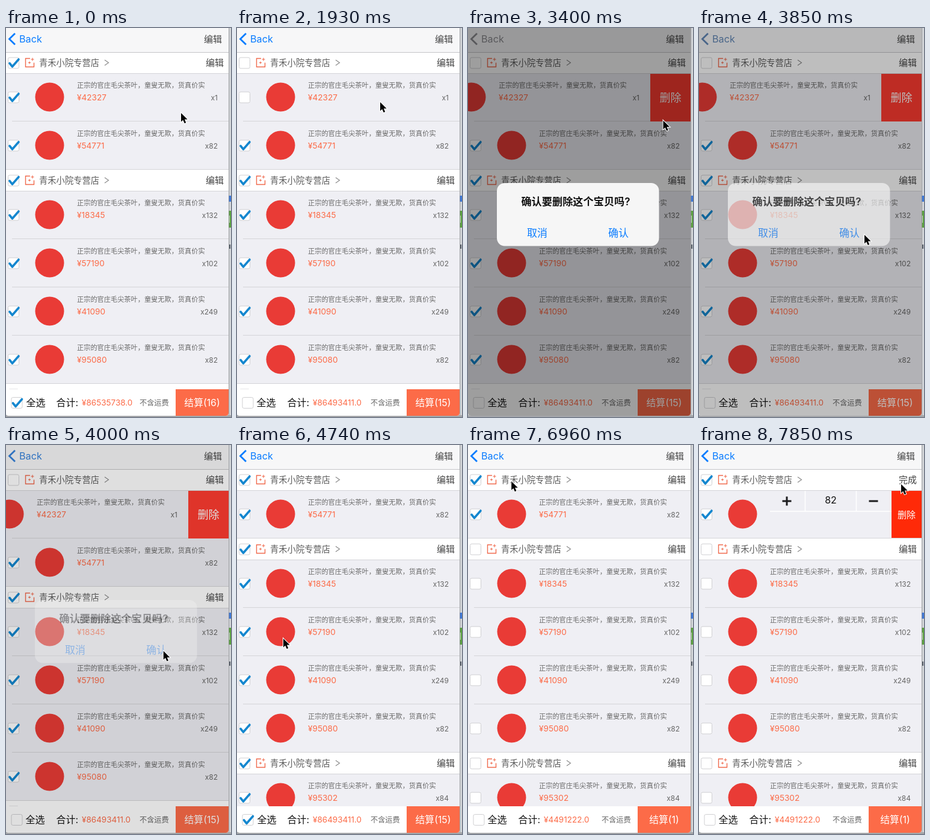
An HTML page for the animation above (8 s loop, 374 by 645 pixels).

```html
<!DOCTYPE html>
<html lang="zh-CN">
<head>
<meta charset="utf-8">
<style>
html, body { margin: 0; width: 100%; height: 100%; overflow: hidden; background: #d3d6d9; }
svg { display: block; width: 374px; height: 645px; }
text { font-family: Inter, "Noto Sans CJK SC", "Noto Sans CJK", sans-serif; white-space: pre; }
</style>
</head>
<body>
<svg id="stage" viewBox="0 0 374 645"></svg>
<script>
const LOOP = 8000, STEPS = 54;
const SHOP = '青禾小院专营店';
const ITEM = '正宗的官庄毛尖茶叶，童叟无欺，货真价实';
const ORANGE = '#fc6b48', BLUE = '#0a7cff';

// Steps at which the user's actions take effect
const UNCHECK = 7, SWIPE = 13, ALERT = 21, DELETED = 28, CLEAR = 37, PICK = 46, EDIT = 52;

// Pointer stops: step, x, y
const stops = [
  [0, 290, 140], [1, 308, 114], [4, 5, 121], [UNCHECK, 10, 122],
  [SWIPE, 237, 122], [16, 160, 124], [20, 322, 184], [22, 332, 120],
  [26, 274, 342], [32, 76, 320], [36, 17, 620], [40, 40, 98],
  [45, 10, 58], [EDIT, 335, 64]
];

const clamp = v => Math.max(0, Math.min(1, v));
const ease = p => (1 - Math.cos(Math.PI * clamp(p))) / 2;

function pointerAt(n) {
  const i = stops.findIndex(s => s[0] > n);
  if (i < 0) return stops[stops.length - 1].slice(1);
  const [n0, x0, y0] = stops[i - 1], [n1, x1, y1] = stops[i];
  const p = ease((n - n0) / (n1 - n0));
  return [x0 + (x1 - x0) * p, y0 + (y1 - y0) * p];
}

const swipeAt = n => 67 * ease((n - SWIPE) / 3);
const alertAt = n => clamp(Math.min((n - ALERT) / 2, (DELETED - n) / 3));

const rect = (x, y, w, h, fill, more = '') =>
  `<rect x="${x}" y="${y}" width="${w}" height="${h}" fill="${fill}" ${more}/>`;
const line = (d, color, width, more = '') =>
  `<path d="${d}" fill="none" style="stroke:${color}" stroke-width="${width}" ${more}/>`;
const text = (s, x, y, size, fill, more = '') =>
  `<text x="${x}" y="${y}" font-size="${size}" style="fill:${fill}" ${more}>${s}</text>`;
const middle = 'text-anchor="middle"', end = 'text-anchor="end"';

function checkbox(x, y, on) {
  return rect(x - 8.5, y - 9, 18, 18, '#fff', 'rx="2.5" stroke="#cfcfd2"') +
    (on ? line(`M${x - 6} ${y + .5}L${x - 1.5} ${y + 6}L${x + 9} ${y - 6}`, '#1587cf', 3.6,
      'stroke-linecap="round" stroke-linejoin="round"') : '');
}

function header(y, on, editing) {
  return rect(0, y, 370, 35, '#fff') +
    line(`M0 ${y - .5}H370M0 ${y + 35.5}H370`, '#d4d4d8', 1) +
    checkbox(12, y + 18, on) +
    line(`M40 ${y + 10.5}H32.5V${y + 24.5}H46.5V${y + 17.5}`, '#f0694c', 1.4) +
    line(`M44 ${y + 9.5}v5M41.5 ${y + 12}h5M39 ${y + 15.5}v4M37 ${y + 17.5}h4`, '#f0694c', 1.1) +
    text(SHOP, 55, y + 23, 14.3, '#5c5c5c') +
    line(`M164 ${y + 13}L170.5 ${y + 17.5}L164 ${y + 22}`, '#888', 1.1) +
    text(editing ? '完成' : '编辑', 332, y + 23, 15, '#444');
}

function editor(y) {
  return line(`M118 ${y + 35}H320M176.5 ${y}V${y + 35}M261.5 ${y}V${y + 35}`, '#fff', 1.5) +
    line(`M138.5 ${y + 18}H153.5M146 ${y + 10.5}V${y + 25.5}M282.5 ${y + 18}H297.5`, '#1c1c1e', 3) +
    text('82', 219, y + 22, 16, '#111', middle) +
    rect(320, y, 50, 80, '#ff2a08') +
    text('删除', 345, y + 45.5, 15, '#fff', middle);
}

function row(y, [price, qty], on, shift, editing) {
  const info = editing ? editor(y) :
    text(ITEM, 118, y + 23.5, 11.2, '#6a6a6a') +
    text('¥' + price, 118, y + 45, 13.6, ORANGE) +
    text('x' + qty, 352, y + 44.5, 12, '#666', end);
  return rect(0, y, 370, 80, '#efeff4') +
    line(`M10 ${y + 79.5}H370`, '#d4d4d8', 1) +
    `<g transform="translate(${-shift} 0)">` + checkbox(12, y + 40, on) +
    `<circle cx="72.5" cy="${y + 39.5}" r="24" fill="#e93b36"/>${info}</g>` +
    rect(370 - shift, y, shift, 80, '#ff3b30') +
    (shift > 40 ? text('删除', 370 - shift / 2, y + 46.5, 18, '#fff', middle) : '');
}

function list(n) {
  const deleted = n >= DELETED, cleared = n >= CLEAR, picked = n >= PICK;
  const groups = [
    [[42327, 1], [54771, 82]].slice(deleted ? 1 : 0),
    [[18345, 132], [57190, 102], [41090, 249], [95080, 82]],
    [[95302, 84]]
  ];
  const unticked = n >= UNCHECK && !deleted;
  let y = 40, out = '';
  groups.forEach((items, g) => {
    const on = !cleared || (g === 0 && picked), editing = g === 0 && n >= EDIT;
    const top = y;
    y += 35;
    items.forEach((item, i) => {
      const first = g === 0 && i === 0 && !deleted;
      out += row(y, item, on && !(first && unticked), first ? swipeAt(n) : 0, editing);
      y += 80;
    });
    out += header(top, on && !(g === 0 && unticked), editing);
  });
  return out;
}

function footer(n) {
  const [sum, count] = n >= PICK ? ['4491222.0', 1] : n >= CLEAR ? ['0.0', 0] :
    n >= UNCHECK ? ['86493411.0', 15] : ['86535738.0', 16];
  const all = n < UNCHECK || (n >= DELETED && n < CLEAR);
  return rect(0, 599, 370, 44, '#fff') + checkbox(17.5, 621.5, all) +
    text('全选', all ? 33.5 : 32.5, 627, 16, '#111') +
    text('合计:', 83.5, 627, 16, '#111') +
    text('¥' + sum, 126, 626, 13.5, ORANGE) +
    text('不含运费', 222, 625.5, 12.2, '#666') +
    rect(282, 599, 88, 44, ORANGE) +
    text(`结算(${count})`, 326, 626.5, 15.8, '#fff', middle);
}

function nav(dim) {
  const tint = `color-mix(in srgb, ${BLUE}, #8e8e93 ${dim * 100}%)`;
  return rect(0, 0, 370, 40, '#f7f7f8') + line('M0 40.5H370', '#c4c4c8', 1) +
    line('M15 9L5.5 18.3L15 27.6', tint, 2.8) +
    text('Back', 22, 24, 16.2, tint) +
    text('编辑', 329, 23.5, 15, '#444');
}

function alertBox(a) {
  if (!a) return '';
  return rect(0, 0, 370, 643, '#000', `opacity="${a * .38}"`) + `<g opacity="${a}">` +
    rect(48, 257, 269.5, 104.5, '#f6f6f6', 'rx="13"') +
    text('确认要删除这个宝贝吗?', 179, 294, 17.2, '#111', middle + ' font-weight="600"') +
    text('取消', 115, 346, 17, BLUE, middle) +
    text('确认', 250, 346, 17, BLUE, middle) + '</g>';
}

function pointer(n) {
  if (n > 1 && n < 4) return '';
  const [x, y] = pointerAt(n);
  return `<path transform="translate(${x} ${y})" d="M1 1V15.5L4.2 12.5L6.7 18L9.2 16.9L6.9 11.6H11.6Z" stroke="#fff" stroke-width="2" paint-order="stroke"/>`;
}

// Sliver of the desktop behind the phone window
const backdrop = rect(0, 0, 374, 645, '#d3d6d9') +
  rect(370, 278, 4, 10, '#3d78d8') + rect(370, 303, 4, 28, '#5aa13f') +
  rect(371, 311, 1, 12, '#d9ead3') + rect(371, 359, 2, 7, '#4d5560') +
  rect(370, 0, 1.2, 645, '#8f9194', 'opacity=".7"') +
  rect(0, 642, 374, 3, '#a5a7aa');

const clip = '<clipPath id="win"><path d="M0 0H370V638Q370 643 365 643H5Q0 643 0 638Z"/></clipPath>';

function scene(n) {
  const dim = alertAt(n);
  return clip + backdrop + '<g clip-path="url(#win)">' + list(n) +
    nav(dim) + footer(n) + alertBox(dim) + '</g>' + pointer(n);
}

const stage = document.getElementById('stage');
let shown = -1;
function tick() {
  // Small lead absorbs the rounding of step times
  const t = (performance.now() + 10) % LOOP;
  const n = Math.floor(t * STEPS / LOOP);
  if (n !== shown) stage.innerHTML = scene(shown = n);
  requestAnimationFrame(tick);
}
tick();
</script>
</body>
</html>
```
